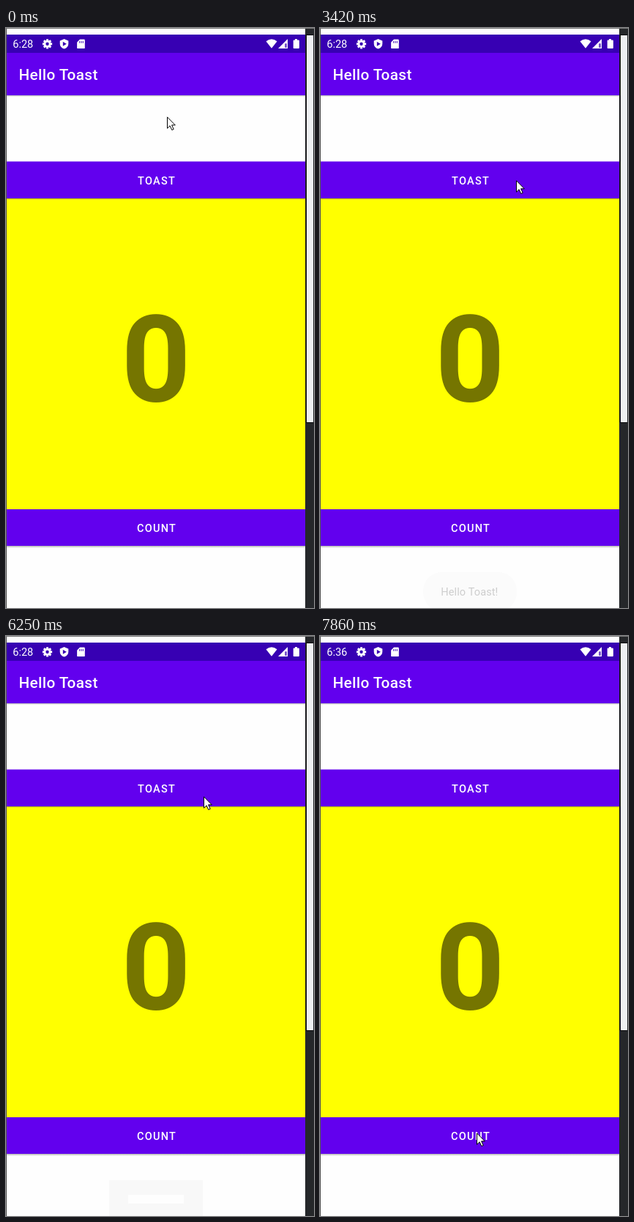
An HTML page for the animation above (7990 ms loop, 421 by 793 pixels).

```html
<!DOCTYPE html>
<html lang="en">
<head>
<meta charset="utf-8">
<title>Hello Toast</title>
<style>
  html, body { margin: 0; width: 100%; height: 100%; overflow: hidden; background: #fff; }
  svg { display: block; width: 100%; height: 100%; font-family: Roboto, sans-serif; }
  .label { font-size: 14.5px; font-weight: 500; letter-spacing: 1.25px; }
</style>
</head>
<body>
<svg viewBox="0 0 421 793" preserveAspectRatio="none">
  <defs>
    <linearGradient id="shade" x2="0" y2="1">
      <stop stop-color="#000" stop-opacity=".3"/>
      <stop offset="1" stop-color="#000" stop-opacity="0"/>
    </linearGradient>
  </defs>
  <rect width="421" height="793" fill="#fefefe"/>

  <g id="toast">
    <rect id="pill" x="141" y="744" width="128" height="53"/>
    <rect id="strip" x="167" y="764" width="76" height="12" fill="#fefefe"/>
    <text id="message" x="165.3" y="776" font-size="14.5" letter-spacing=".12" fill="#1c1c1c">Hello Toast!</text>
  </g>

  <rect y="9" width="410" height="25" fill="#3700b3"/>
  <rect y="34" width="410" height="58" fill="#6200ee"/>
  <rect y="92" width="410" height="2" fill="url(#shade)"/>
  <rect y="233" width="410" height="425" fill="#ff0"/>
  <rect y="182.5" width="410" height="50.5" fill="#6200ee"/>
  <rect y="233" width="410" height="2" fill="url(#shade)"/>
  <rect y="658" width="410" height="50" fill="#6200ee"/>
  <rect y="708" width="410" height="3" fill="url(#shade)"/>

  <g fill="#fff">
    <text id="clock" x="9.3" y="27" font-size="14.5"></text>
    <g id="gear" transform="translate(56.5 21.8)">
      <circle r="3.6" fill="none" stroke="#fff" stroke-width="2.8"/>
    </g>
    <path d="M79.5 15l5.8 2.4v4q0 5-5.8 7.2q-5.8-2.2-5.8-7.2v-4z"/>
    <path d="M77.8 18.8l5 3-5 3z" fill="#3700b3"/>
    <path d="M101 15.5h5.6q1.2 0 1.2 1.2v10.2q0 1.2-1.2 1.2h-8.3q-1.2 0-1.2-1.2v-7.5z"/>
    <path d="M100.7 18v2.6M103 18v2.6M105.3 18v2.6" stroke="#3700b3"/>
    <path d="M355.5 18.2q7.5-5.8 15 0l-7.5 9.6z"/>
    <path d="M385 15v13h-13z"/>
    <path d="M381.2 21.2h2.6v5.6h-2.6z" fill="#3700b3" opacity=".75"/>
    <path d="M395 15h3v1.4h2q.9 0 .9.9v9.8q0 .9-.9.9h-6.4q-.9 0-.9-.9v-9.8q0-.9.9-.9h1.4z"/>
    <text x="17.4" y="71" font-size="20.7" font-weight="500" letter-spacing=".42">Hello Toast</text>
    <g class="label" text-anchor="middle">
      <text x="206" y="214">TOAST</text>
      <text x="206" y="689">COUNT</text>
    </g>
  </g>
  <text x="205" y="509.7" font-size="165.8" font-weight="700" text-anchor="middle" fill="#757500">0</text>

  <rect width="1" height="793" fill="#555"/>
  <rect x="409" width="12" height="793" fill="#25272a"/>
  <rect x="410" y="9" width="10" height="531" fill="#08080a"/>
  <rect x="411" y="10" width="9" height="529" fill="#eef0f2"/>
  <rect width="421" height="1" fill="#777"/>

  <path id="cursor" d="M.5.8v15.4l3.6-3.5 2.7 5.8 2.4-1.1-2.6-5.6h4.7z" fill="#fff" stroke="#000" stroke-linejoin="round"/>
</svg>
<script>
const LOOP = 7990;
const STEP = 120; // ms between screen updates
const LEAVE = 6940, RETURN = 7470; // pointer is off the screen in between
const $ = id => document.getElementById(id);

// Each visit has an entry point and eased moves to further points.
const firstVisit = {
  x: 220, y: 121,
  moves: [
    { start: 820, steps: 1, x: 215, y: 121 },
    { start: 2060, steps: 3, x: 206, y: 125 },
    { start: 2490, steps: 2, x: 137, y: 110 },
    { start: 2760, steps: 2, x: 343, y: 199 },
    { start: 3030, steps: 2, x: 268, y: 208 },
    { start: 6250, steps: 1, x: 270, y: 219 },
    { start: 6390, steps: 2, x: 374, y: 474 },
    { start: 6670, steps: 2, x: 370, y: 772 }
  ]
};
const secondVisit = {
  x: 223, y: 674,
  moves: [{ start: RETURN, steps: 4, x: 214, y: 679 }]
};

const clamp = v => Math.max(0, Math.min(1, v));
const easeOut = p => 1 - (1 - p) ** 2;

function pointer({ x, y, moves }, t) {
  for (const move of moves) {
    if (t < move.start) break;
    const done = Math.floor((t - move.start) / STEP) + 1;
    const p = easeOut(clamp(done / move.steps));
    x += (move.x - x) * p;
    y += (move.y - y) * p;
  }
  return [Math.round(x), Math.round(y)];
}

// Rises from 0 to 1 in equal steps.
const ramp = (t, start, steps) => clamp(Math.floor((t - start) / STEP) / steps);

for (let i = 0; i < 8; i++) {
  const tooth = document.createElementNS("http://www.w3.org/2000/svg", "rect");
  const attrs = { x: -1.5, y: -6.6, width: 3, height: 2.6, transform: `rotate(${i * 45})` };
  for (const key in attrs) tooth.setAttribute(key, attrs[key]);
  $("gear").append(tooth);
}

const show = (id, visible) => { $(id).style.display = visible ? "" : "none"; };

function draw(t) {
  const visit = t < LEAVE ? firstVisit : secondVisit;
  show("cursor", t < LEAVE || t >= RETURN);
  $("cursor").setAttribute("transform", `translate(${pointer(visit, t)})`);

  const alpha = ramp(t, 3300, 5) - ramp(t, 5520, 4);
  const residue = t >= 6000;
  const tone = residue ? 248 : 254 - 14 * alpha;
  show("toast", t >= 3420 && t < 7210);
  show("strip", residue);
  $("pill").setAttribute("fill", `rgb(${tone},${tone},${tone})`);
  $("pill").setAttribute("rx", residue ? 0 : 25);
  $("message").setAttribute("opacity", alpha);

  $("clock").textContent = t < 7350 ? "6:28" : "6:36";
}

const start = performance.now();
function tick() {
  draw((performance.now() - start) % LOOP);
  requestAnimationFrame(tick);
}
tick();
</script>
</body>
</html>
```
